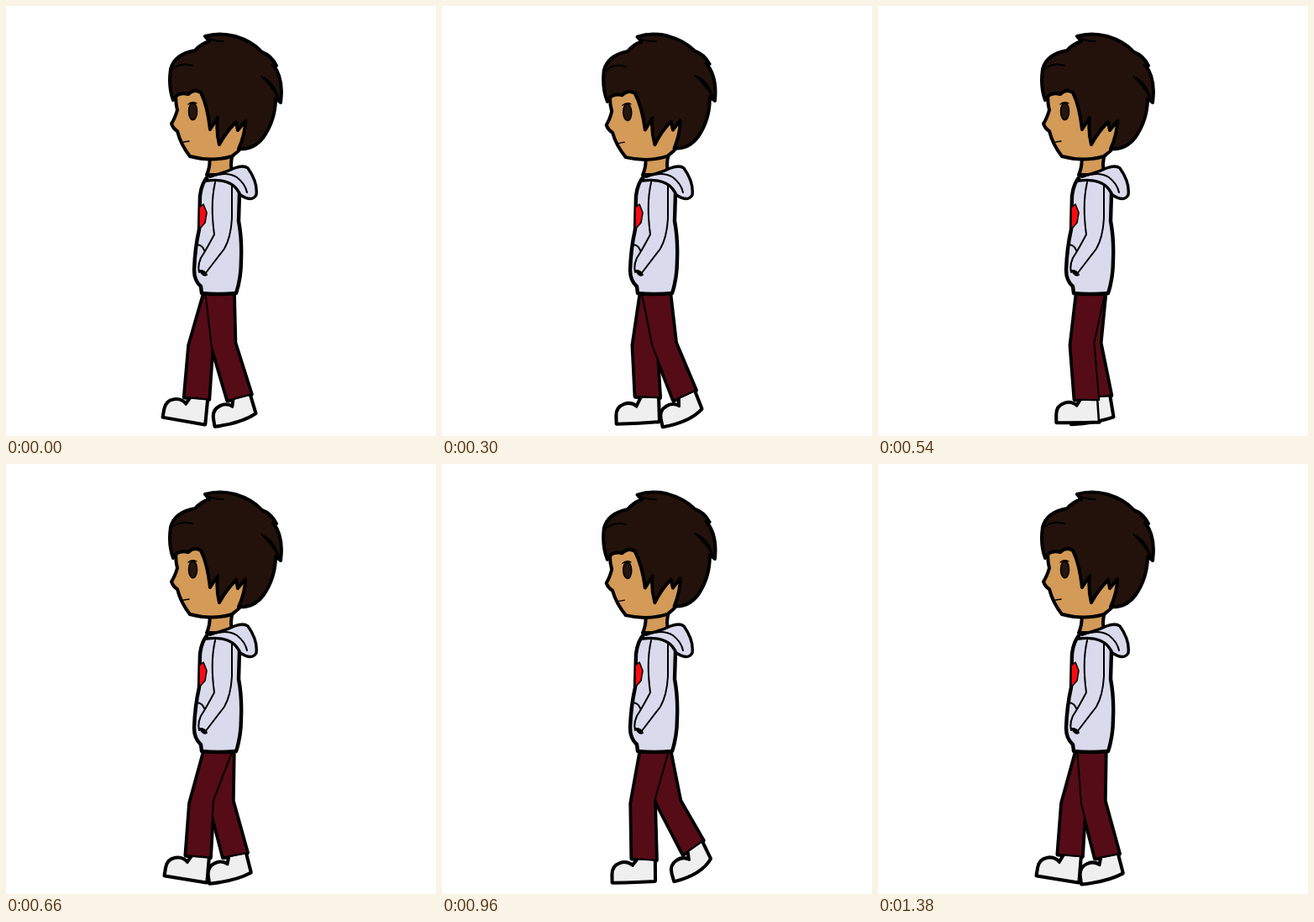
Animation, 512 px wide and 512 px high, one loop 1440 ms. Source, as an HTML page:

```html
<!DOCTYPE html>
<html lang="en">
<head>
<meta charset="utf-8">
<title>Walk cycle</title>
<style>
  html, body { margin: 0; width: 100%; height: 100%; overflow: hidden; background: #fefefe; }
  svg { display: block; width: 100vw; height: 100vh; }
  path, ellipse { stroke: #000; stroke-linejoin: round; stroke-linecap: round; }
  .rim { fill: #000; stroke-width: 5.5; }
  .shoe { fill: #efefef; stroke-width: 2.6; }
  .pants { fill: #550c16; stroke-width: 2; }
  .skin { fill: #d39a58; stroke-width: 4; }
  .cloth { fill: #d9daec; stroke-width: 4.4; }
  .hair { fill: #22120b; stroke-width: 4; }
  .line { fill: none; stroke-width: 2; }
</style>
</head>
<body>
<svg viewBox="0 0 512 512">
  <g id="legs"></g>

  <path class="skin" d="M242 176 Q244 190 239 201 L270 201 Q266 190 270 176Z"/>

  <g id="hoodie">
    <path class="cloth" d="M241 202 Q233 210 231 226 L230 266 Q225 288 224 314 Q224 327 232 334 L233 342
      Q250 344 274 342 Q280 324 280 302 Q281 277 277 256 L278 222 Q265 198 241 202Z"/>
    <path d="M230 240 L235 236 L239 246 L237 258 L230 266Z" fill="#fa0a12" stroke-width="1.6"/>
    <path class="line" d="M249 210 Q243 236 248 272 Q238 291 232 300 Q228 309 230 317
      M269 213 L269 252 Q268 275 260 289 L237 319 M228 284 Q234 285 236 291"/>
    <path d="M231 315 Q237 315 239 320 Q235 323 231 315Z" stroke-width="2"/>
    <path class="cloth" style="stroke-width:3.4" d="M240 203 Q258 200 272 193 Q283 189 288 193 Q300 210 298 225
      Q293 234 279 225 Q270 204 239 208Z"/>
    <path class="line" d="M243 204 Q262 196 275 204 Q285 212 287 222"/>
  </g>

  <g id="head">
    <path class="skin" d="M203 98 Q201 113 204 124 Q201 134 197 140 Q199 146 204 149 Q208 165 219 179
      Q245 186 269 179 Q285 168 290 150 L270 90Z"/>
    <path class="hair" d="M204 106 L199 112 Q193 96 196 75 Q201 57 225 53 Q232 45 242 42 L237 36 Q254 31 273 36
      Q293 42 305 55 Q316 59 322 71 L318 70 Q331 86 327 115 L321 110
      Q321 136 306 157 Q294 172 277 170 Q285 152 285 137 L276 148 L274 138
      Q262 150 254 165 Q250 149 252 133 Q247 141 243 147 Q240 119 232 103 Q224 98 217 105 Q209 103 204 106Z"/>
    <path class="line" d="M196 77 Q207 66 222 71 M237 37 Q247 42 259 42"/>
    <path d="M304 84 Q320 90 325 111 Q316 95 304 84Z" stroke-width="1.5"/>
    <ellipse cx="222.500" cy="125.500" rx="5" ry="10" fill="#26160e" stroke-width="1.5"/>
    <path class="line" style="stroke-width:1.4" d="M217 117 Q222 113 227 116 M211 162 L218 161"/>
  </g>
</svg>

<script>
const LOOP = 1440, STEP = 60, STANCE = 960, SWING = 430;
const RAD = Math.PI / 180;

// reach: 0 = leg fully forward, 1 = fully back; lead: toe raised around heel strike
function stride(t) {
  const u = (t + LOOP / 2) % LOOP;
  if (u < STANCE) {
    const s = u / STANCE;
    return { reach: s ** 1.2, lead: Math.max(0, 1 - 5 * s) };
  }
  const v = Math.min(1, (u - STANCE) / SWING);
  return { reach: 1 - v, lead: v ** 3 };
}

const spot = (x, y, angle) => (dx, dy) =>
  `${x + dx * Math.cos(angle) - dy * Math.sin(angle)} ${y + dx * Math.sin(angle) + dy * Math.cos(angle)}`;

function legPaths(t, lift) {
  const { reach, lead } = stride(t);
  const x = 227 + 72 * reach;
  const y = 471 - 10 * reach ** 2 - 4 * lead;
  const knee = 232 + 37.5 * reach;
  const hem = spot(x, y - lift, (5 - 40 * reach ** 2) * RAD);
  const pants = `M237 338L${knee - 14} 404L${hem(-14.5, 0)}L${hem(14.5, 0)}L${knee + 14} 401L271 338Z`;

  // The toe box tilts less than the sole when the foot pushes off.
  const tilt = (10 * lead - 32 * reach ** 1.7) * RAD;
  const sole = spot(x - 15 + 14 * reach, y + 26.5 - lift * reach, tilt);
  const [tx, ty] = sole(-25, 0).split(' ').map(Number);
  const toe = spot(tx, ty, tilt < 0 ? tilt / 2 : tilt);
  const bulge = tilt < 0 ? -18 * tilt : 0;
  const shoe = `M${hem(-7, 0)}L${toe(24, -19)}Q${toe(17, -25)} ${toe(9, -22)}Q${toe(0, -19)} ${toe(0, -9)}` +
    `L${sole(-25, 0)}Q${sole(6, bulge)} ${sole(25, 0)}L${hem(12.5, 0)}Z`;
  return [shoe, pants];
}

const legs = document.getElementById('legs');
const head = document.getElementById('head');

function addPath(cls) {
  const p = document.createElementNS('http://www.w3.org/2000/svg', 'path');
  p.setAttribute('class', cls);
  return legs.appendChild(p);
}

const rims = ['rim', 'rim', 'rim', 'rim'].map(addPath);
const parts = ['shoe', 'pants', 'shoe', 'pants'].map(addPath);

function draw(t) {
  const lift = 5 * Math.abs(Math.sin(2 * Math.PI * t / LOOP));
  const shapes = [...legPaths(t + LOOP / 2, lift), ...legPaths(t, 0)];
  shapes.forEach((d, i) => {
    rims[i].setAttribute('d', d);
    parts[i].setAttribute('d', d);
  });
  const phase = t % (LOOP / 2);
  const nod = phase >= 120 && phase <= 300 ? -1.7 : 0;
  head.setAttribute('transform', `rotate(${nod} 256 185)`);
}

const start = performance.now();
function tick() {
  const t = (performance.now() - start) % LOOP;
  draw(Math.floor(t / STEP) * STEP);
  requestAnimationFrame(tick);
}
tick();
</script>
</body>
</html>
```
